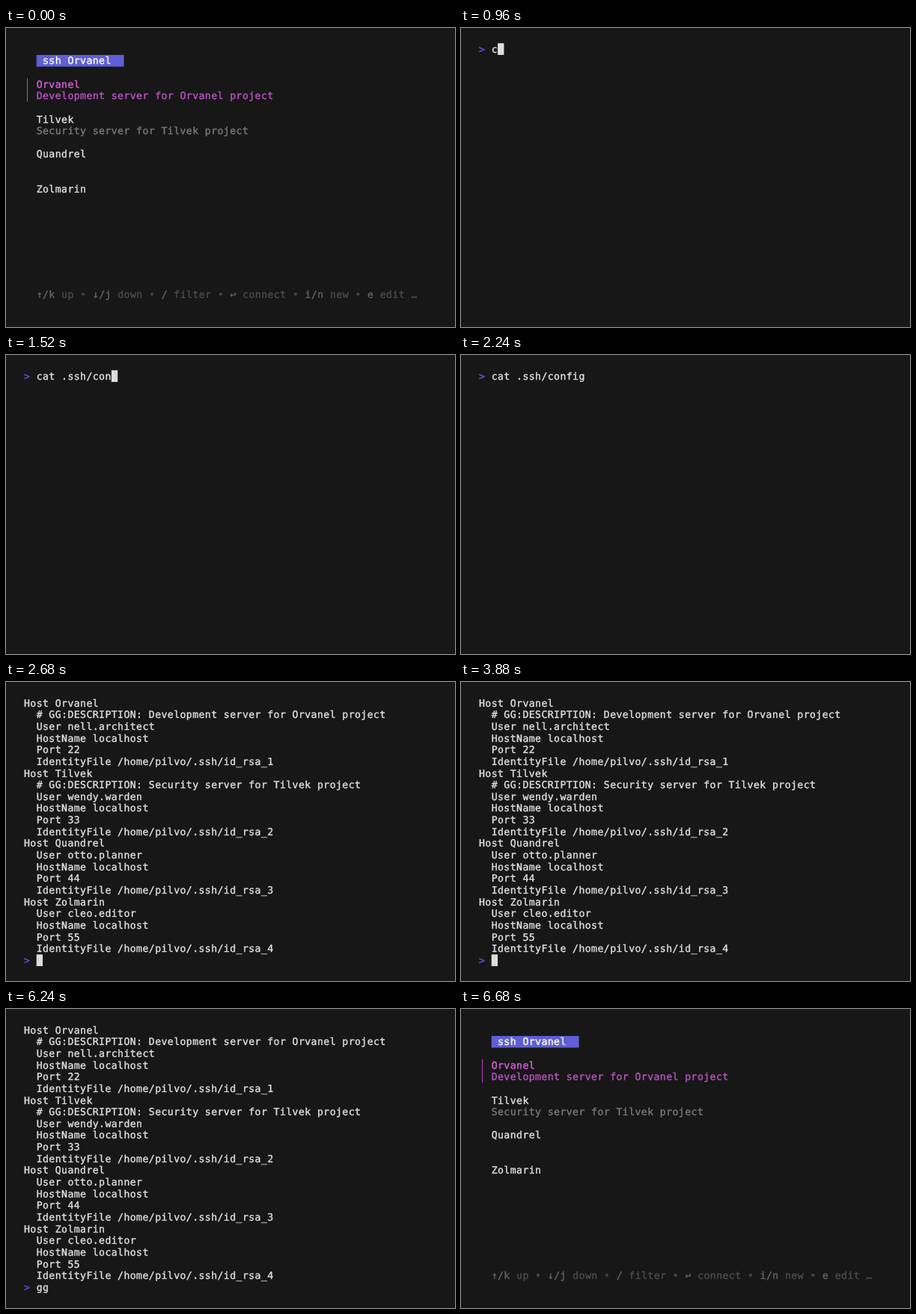
Animation of 600 by 400 pixels, one loop 8000 ms. Source, as an HTML page:

```html
<!DOCTYPE html>
<html lang="en">
<head>
<meta charset="utf-8">
<title>Terminal session</title>
<style>
  html, body { margin: 0; width: 100%; height: 100%; overflow: hidden; background: #171717; }
  svg { display: block; width: 600px; height: 400px; }
  text {
    font: 13.2px "DejaVu Sans Mono", "Liberation Mono", monospace;
    letter-spacing: .4px;
    white-space: pre;
    text-rendering: geometricPrecision;
    fill: currentColor;
    stroke: currentColor;
    stroke-width: .4px;
  }
</style>
</head>
<body>
<svg id="stage" viewBox="0 0 600 400">
  <rect width="600" height="400" fill="#171717"/>
  <g id="shell"></g>
  <g id="menu"></g>
</svg>
<script>
const LOOP = 8000, TICK = 40;
const CELL_W = 8.347, CELL_H = 15.64, LEFT = 24, TOP = 20.4;
const PROMPT = "#5a56e0", LIGHT = "#ddd";
const COMMAND = "cat .ssh/config";

const cellX = col => LEFT + col * CELL_W;
const cellY = row => TOP + row * CELL_H;

function add(parent, tag, attrs) {
  const node = document.createElementNS("http://www.w3.org/2000/svg", tag);
  for (const key in attrs) node.setAttribute(key, attrs[key]);
  return parent.appendChild(node);
}

function write(parent, col, row, content, color = LIGHT) {
  const node = add(parent, "text", { x: cellX(col), y: cellY(row) + 12.3, color });
  node.textContent = content;
  return node;
}

function block(parent, col, row, cols, color) {
  return add(parent, "rect", {
    x: cellX(col), y: cellY(row), width: cols * CELL_W, height: CELL_H, fill: color
  });
}

const hosts = [
  { name: "Orvanel", about: "Development server for Orvanel project", user: "nell.architect" },
  { name: "Tilvek", about: "Security server for Tilvek project", user: "wendy.warden" },
  { name: "Quandrel", user: "otto.planner" },
  { name: "Zolmarin", user: "cleo.editor" }
];

const config = hosts.flatMap(({ name, about, user }, i) => [
  `Host ${name}`,
  ...(about ? [`  # GG:DESCRIPTION: ${about}`] : []),
  `  User ${user}`,
  "  HostName localhost",
  `  Port ${(i + 2) * 11}`,
  `  IdentityFile /home/pilvo/.ssh/id_rsa_${i + 1}`
]);

// Shell: config listing, prompt line and cursor
const shell = document.getElementById("shell");
const listing = add(shell, "g", {});
config.forEach((line, row) => write(listing, 0, row, line));
const promptLine = add(shell, "g", {});
write(promptLine, 0, 0, ">", PROMPT);
const input = write(promptLine, 2, 0, "");
const cursor = block(promptLine, 2, 0, 1, LIGHT);

// Menu: host list and key help
const menu = document.getElementById("menu");
block(menu, 2, 1, 14, "#5f5fd7");
write(menu, 3, 1, `ssh ${hosts[0].name}`, "#ffffe0");
add(menu, "rect", { x: 28, y: cellY(3), width: 1, height: 2 * CELL_H, fill: "#b04fb8" });
hosts.forEach(({ name, about }, i) => {
  const row = 3 + i * 3;
  write(menu, 2, row, name, i ? LIGHT : "#d75fd7");
  if (about) write(menu, 2, row + 1, about, i ? "#777" : "#b950c3");
});

const keys = [["↑/k", "up"], ["↓/j", "down"], ["/", "filter"], ["↩", "connect"], ["i/n", "new"], ["e", "edit"]];
let col = 2;
keys.forEach(([key, action], i) => {
  write(menu, col, 21, key, "#626262");
  col += key.length + 1;
  write(menu, col, 21, action, "#4a4a4a");
  col += action.length + 1;
  write(menu, col, 21, i < keys.length - 1 ? "•" : "…", "#444");
  col += 2;
});

function typedText(t) {
  if (t < 2680) return COMMAND.slice(0, Math.floor((t - 946) / 51.4) + 1);
  return t < 5600 ? "" : t < 5640 ? "g" : "gg";
}

function cursorVisible(t) {
  const off = [[2240, 2680], [3280, 3880], [4440, 5000], [5560, 5600], [6240, 6680]];
  return !off.some(([from, to]) => t >= from && t < to);
}

function show(node, visible) {
  node.style.display = visible ? "" : "none";
}

function render(time) {
  const t = Math.floor((time % LOOP) / TICK) * TICK;
  const inMenu = t < 960 || t >= 6680;
  show(menu, inMenu);
  show(shell, !inMenu);
  if (inMenu) return;

  const listed = t >= 2680;
  const typed = typedText(t);
  show(listing, listed);
  promptLine.setAttribute("transform", `translate(0 ${listed ? config.length * CELL_H : 0})`);
  input.textContent = typed;
  cursor.setAttribute("x", cellX(2 + typed.length));
  show(cursor, cursorVisible(t));
}

const start = performance.now();
function loop() {
  render(performance.now() - start);
  requestAnimationFrame(loop);
}
loop();
</script>
</body>
</html>
```
